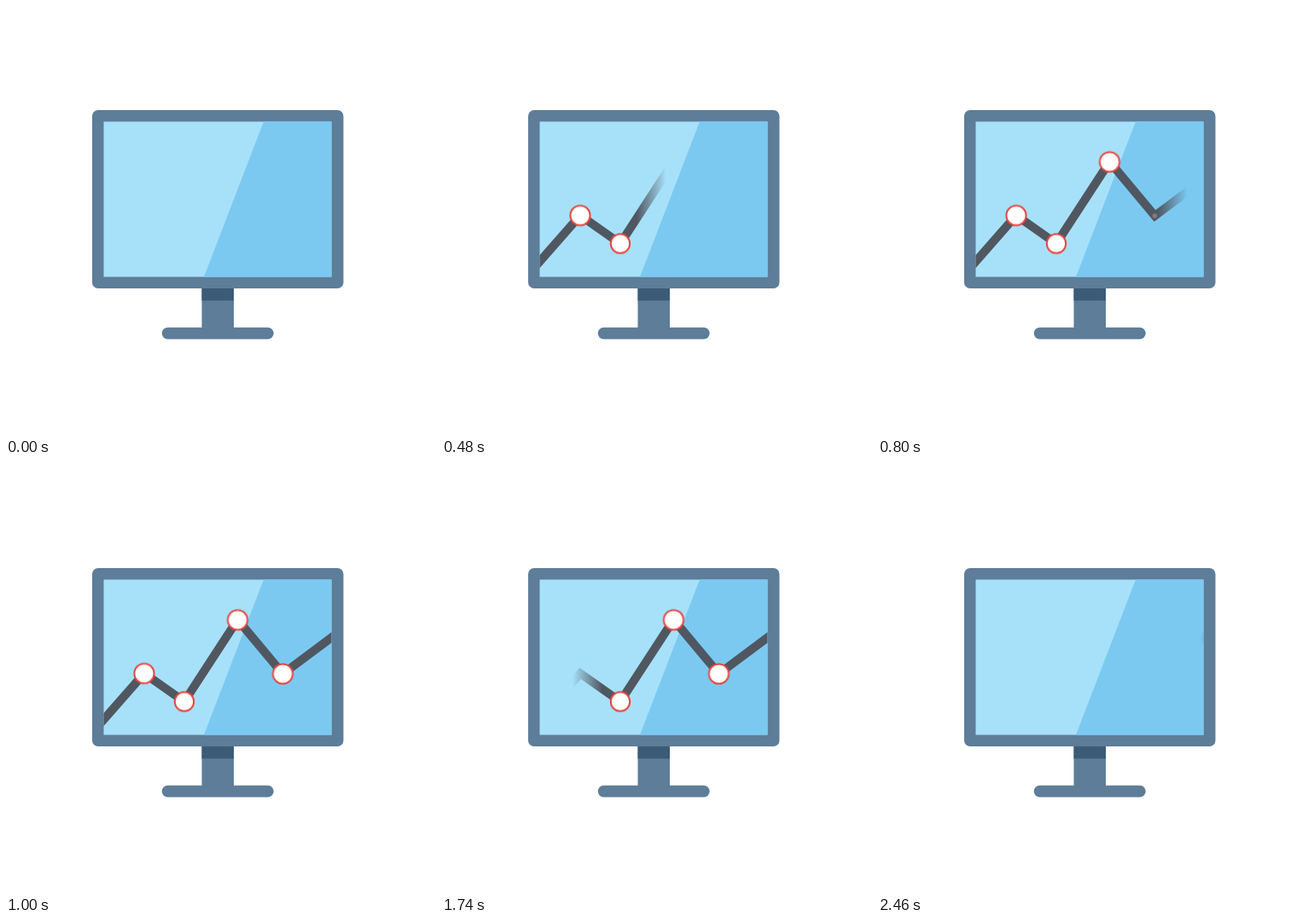
Animation of 504 by 504 pixels, one loop 2500 ms. Source, as an HTML page without scripts:

```html
<!DOCTYPE html>
<html lang="en">
<head>
<meta charset="utf-8">
<title>Monitor chart</title>
<style>
html, body { margin: 0; width: 100%; height: 100%; overflow: hidden; background: #fff; }
svg { display: block; width: 100vw; height: 100vh; }

.window { animation: sweep 2.5s infinite; }
.dot { fill: #fff; stroke: #e8453f; stroke-width: 2; animation: 2.5s infinite; }
.d1 { animation-name: pop1; }
.d2 { animation-name: pop2; }
.d3 { animation-name: pop3; }
.d4 { animation-name: pop4; }

/* The soft-edged window enters from the left, waits, then leaves to the right. */
@keyframes sweep {
  0% { transform: translateX(113px); animation-timing-function: steps(25); }
  40%, 60% { transform: translateX(425px); animation-timing-function: steps(25); }
  100% { transform: translateX(737px); }
}
/* Each dot grows and shrinks over 160 ms. */
@keyframes pop1 {
  0%, 4.8% { transform: scale(0); opacity: 0; animation-timing-function: steps(4); }
  11.2%, 63.2% { transform: scale(1); opacity: 1; animation-timing-function: steps(4); }
  69.6%, 100% { transform: scale(0); opacity: 0; }
}
@keyframes pop2 {
  0%, 11.2% { transform: scale(0); opacity: 0; animation-timing-function: steps(4); }
  17.6%, 72.8% { transform: scale(1); opacity: 1; animation-timing-function: steps(4); }
  79.2%, 100% { transform: scale(0); opacity: 0; }
}
@keyframes pop3 {
  0%, 22.4% { transform: scale(0); opacity: 0; animation-timing-function: steps(4); }
  28.8%, 80.8% { transform: scale(1); opacity: 1; animation-timing-function: steps(4); }
  87.2%, 100% { transform: scale(0); opacity: 0; }
}
@keyframes pop4 {
  0%, 30.4% { transform: scale(0); opacity: 0; animation-timing-function: steps(4); }
  36.8%, 87.2% { transform: scale(1); opacity: 1; animation-timing-function: steps(4); }
  93.6%, 100% { transform: scale(0); opacity: 0; }
}
</style>
</head>
<body>
<svg viewBox="0 0 504 504">
  <defs>
    <linearGradient id="fade">
      <stop offset="0" stop-color="#fff" stop-opacity="0"/>
      <stop offset=".1" stop-color="#fff"/>
      <stop offset=".9" stop-color="#fff"/>
      <stop offset="1" stop-color="#fff" stop-opacity="0"/>
    </linearGradient>
    <mask id="reveal" maskUnits="userSpaceOnUse" x="0" y="0" width="504" height="504">
      <rect class="window" x="-347" y="100" width="347" height="260" fill="url(#fade)"/>
    </mask>
    <clipPath id="screen"><rect x="114.5" y="135.5" width="267" height="182"/></clipPath>
  </defs>

  <rect x="229.5" y="330" width="37.5" height="50" fill="#5d7d99"/>
  <rect x="229.5" y="330" width="37.5" height="15.3" fill="#3b5b76"/>
  <rect x="182.7" y="376.7" width="131" height="13.8" rx="6.9" fill="#5d7d99"/>
  <rect x="101" y="122" width="294.5" height="209" rx="7" fill="#5d7d99"/>
  <rect x="114.5" y="135.5" width="267" height="182" fill="#a7e1f9"/>
  <path d="M302 135.5H381.5V317.5H232Z" fill="#7bc9f1"/>

  <g clip-path="url(#screen)">
    <g mask="url(#reveal)">
      <path d="M101 315L162 245.5L209 278.5L271.5 182.5L324.5 246L396 192.5" fill="none" stroke="#505761" stroke-width="10"/>
    </g>
  </g>

  <g transform="translate(162 245.5)"><circle class="dot d1" r="11.6"/></g>
  <g transform="translate(209 278.5)"><circle class="dot d2" r="11.2"/></g>
  <g transform="translate(271.5 182.7)"><circle class="dot d3" r="11.6"/></g>
  <g transform="translate(324.5 246)"><circle class="dot d4" r="11.6"/></g>
</svg>
</body>
</html>
```
